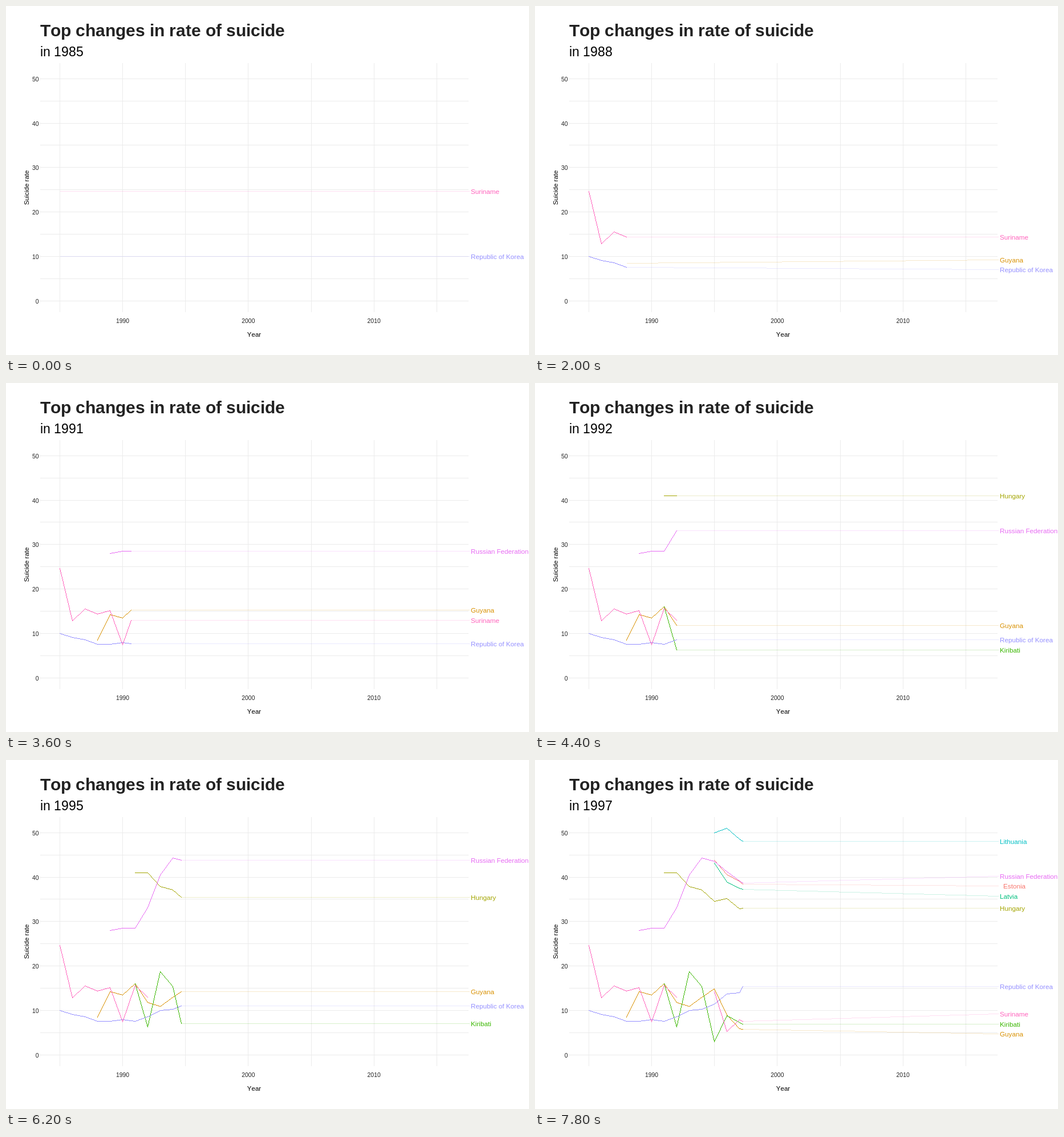
Write an HTML page with a canvas that moves like this. It is 917 px wide and 611 px high and loops after 8000 ms.

```html
<!DOCTYPE html>
<html lang="en">
<head>
<meta charset="utf-8">
<title>Top changes in rate of suicide</title>
<style>
  html, body { margin: 0; width: 100%; height: 100%; overflow: hidden; background: #fff; }
  canvas { display: block; width: 917px; height: 611px; }
</style>
</head>
<body>
<canvas id="chart" width="917" height="611"></canvas>
<script>
const ctx = document.getElementById('chart').getContext('2d');
const FONT = '"Liberation Sans", Arial, sans-serif';
const STEP = 200, FRAMES = 40, FIRST = 1985;
const PANEL = { left: 60, right: 811, top: 100, bottom: 536 };
const LABEL_X = 815, LABEL_GAP = 17.5, CLUSTER_LIFT = 1;

// Each series: name, colour, first year, heights in px for consecutive years
const SERIES = [
  ['Estonia', '#F8766D', 1995, [175.5, 200.5, 212, 232]],
  ['Guyana', '#D89000', 1988, [450, 405, 411, 391.5, 424, 431.5, 415.5, 400.5, 446, 470, 474]],
  ['Hungary', '#A3A500', 1991, [197.5, 197.5, 221, 227, 247, 242, 260.5, 256.5]],
  ['Kiribati', '#39B600', 1991, [391, 467.5, 370, 396.5, 493.5, 447, 459, 471]],
  ['Latvia', '#00BF7D', 1995, [180, 213, 224, 234]],
  ['Lithuania', '#00BFC4', 1995, [127, 119.5, 138.5, 154]],
  ['Republic of Korea', '#9590FF', 1985,
    [438.5, 445, 449.5, 457.5, 457, 454.5, 457, 449, 438, 436.5, 427, 409, 407.5, 363]],
  ['Russian Federation', '#E76BF3', 1989,
    [298.5, 294, 294, 258, 201, 171.5, 177.5, 195, 211.5, 227]],
  ['Suriname', '#FF62BC', 1985, [324, 416.5, 395, 404.5, 398, 458.5, 394.5, 415]],
  ['Suriname', '#FF62BC', 1995, [405, 475, 454.5, 466]]
].map(([name, color, start, ys]) => ({ name, color, start, ys, end: start + ys.length - 1 }));

const xOf = year => 94.4 + 22.03 * (year - FIRST);
const gridY = i => Math.floor(516.3 - 38.9 * i);
const keyFrame = k => Math.round(k * 99 / 31);

// Years are reached on whole frames, three or four frames apart
function yearAt(frame) {
  let k = 0;
  while (keyFrame(k + 1) <= frame) k++;
  return FIRST + k + (frame - keyFrame(k)) / (keyFrame(k + 1) - keyFrame(k));
}

function valueAt(s, year) {
  const p = Math.min(year, s.end) - s.start, i = Math.floor(p);
  return i + 1 < s.ys.length ? s.ys[i] + (s.ys[i + 1] - s.ys[i]) * (p - i) : s.ys[i];
}

// One pixel wide line without smoothing
function line(x0, y0, x1, y1) {
  x0 = Math.floor(x0); y0 = Math.floor(y0);
  const dx = Math.floor(x1) - x0, dy = Math.floor(y1) - y0;
  const n = Math.max(Math.abs(dx), Math.abs(dy), 1);
  for (let i = 0; i <= n; i++) {
    ctx.fillRect(x0 + Math.round(dx * i / n), y0 + Math.round(dy * i / n), 1, 1);
  }
}

function setText(size, color, align, weight) {
  ctx.font = `${weight} ${size}px ${FONT}`;
  ctx.fontKerning = 'none';
  ctx.fillStyle = color;
  ctx.textAlign = align;
}

function text(str, x, y, size, color = '#000', align = 'left') {
  setText(size, color, align, 'normal');
  ctx.fillText(str, x, y);
}

// Headings advance by whole pixels from letter to letter
function heading(str, x, y, size, color, weight) {
  setText(size, color, 'left', weight);
  for (const ch of str) {
    ctx.fillText(ch, x, y);
    x += Math.round(ctx.measureText(ch).width);
  }
}

function drawBase(year) {
  ctx.fillStyle = '#fff';
  ctx.fillRect(0, 0, 917, 611);
  ctx.fillStyle = '#ebebeb';
  for (let i = 0; i <= 10; i++) {
    ctx.fillRect(PANEL.left, gridY(i), PANEL.right - PANEL.left, 1);
  }
  for (let y = 1985; y <= 2015; y += 5) {
    ctx.fillRect(Math.floor(xOf(y)), PANEL.top, 1, PANEL.bottom - PANEL.top);
  }
  for (let i = 0; i <= 10; i += 2) text(i * 5, 57.5, gridY(i) + 5, 10.4, '#222', 'right');
  for (let y = 1990; y <= 2010; y += 10) text(y, xOf(y), 555, 10.4, '#222', 'center');
  heading('Top changes in rate of suicide', 60, 53, 30, '#222', 'bold');
  heading('in ' + year, 60, 88, 23, '#000', 'normal');
  text('Year', 435, 579, 11.5, '#000', 'center');
  ctx.save();
  ctx.translate(40, 318);
  ctx.rotate(-Math.PI / 2);
  text('Suicide rate', 0, 0, 11.5, '#000', 'center');
  ctx.restore();
}

function drawSeries(s, year) {
  ctx.fillStyle = s.color;
  const last = Math.min(year, s.end);
  for (let y = s.start; y < last; y++) {
    const next = Math.min(y + 1, last);
    line(xOf(y), valueAt(s, y), xOf(next), valueAt(s, next));
  }
}

// Moves overlapping labels apart, keeping each cluster near its anchors
function placeLabels(labels) {
  labels.sort((a, b) => a.want - b.want);
  const blocks = [];
  labels.forEach((label, i) => {
    let block = { sum: label.want - i * LABEL_GAP, n: 1 };
    let prev = blocks[blocks.length - 1];
    while (prev && prev.sum / prev.n > block.sum / block.n) {
      block = { sum: block.sum + prev.sum, n: block.n + prev.n };
      blocks.pop();
      prev = blocks[blocks.length - 1];
    }
    blocks.push(block);
  });
  let i = 0;
  for (const { sum, n } of blocks) {
    const base = sum / n - (n > 1 ? CLUSTER_LIFT : 0);
    for (let j = 0; j < n; j++, i++) labels[i].y = base + i * LABEL_GAP;
  }
  return labels;
}

function draw(frame) {
  const year = yearAt(frame);
  drawBase(Math.round(FIRST + frame * 31 / 99));
  const shown = SERIES.filter(s => year >= s.start);
  shown.forEach(s => drawSeries(s, year));

  const labels = placeLabels(shown.filter(s => year < s.end).map(s => {
    const at = valueAt(s, year), inset = s.name === 'Estonia' ? 6 : 0;
    return { s, at, inset, want: at + inset };
  }));
  for (const { s, at, y, inset } of labels) {
    ctx.fillStyle = s.color;
    ctx.globalAlpha = 0.2;
    line(xOf(year) + 1, at, 812, y);
    ctx.globalAlpha = 1;
    text(s.name, LABEL_X + inset, Math.floor(y + 5), 11.7, s.color);
  }
}

let current = -1;
function tick(now) {
  const frame = Math.floor(now / STEP) % FRAMES;
  if (frame !== current) draw(current = frame);
  requestAnimationFrame(tick);
}
draw(0);
requestAnimationFrame(tick);
</script>
</body>
</html>
```
